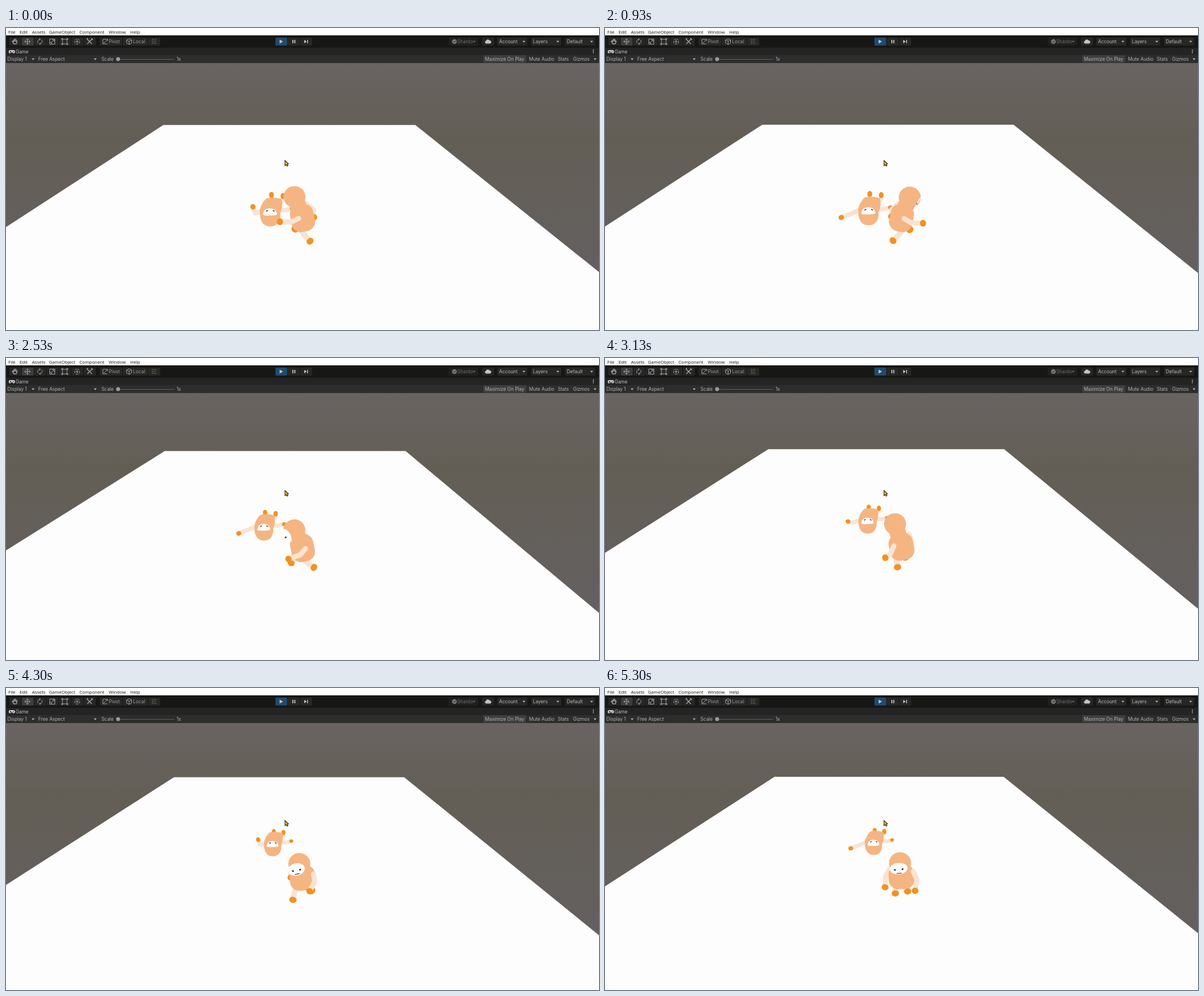
Recreate the animation shown at these times as an HTML page. Size 1050x534 px, loop 5.33 s.

```html
<!DOCTYPE html>
<html lang="en">
<head>
<meta charset="utf-8">
<title>Game view</title>
<style>
html, body { margin: 0; width: 100%; height: 100%; overflow: hidden; background: #191919; }
svg { display: block; width: 100vw; height: 100vh; }
text { font: 8.3px Inter, Roboto, sans-serif; fill: #bcbcbc; white-space: pre; }
.menu text { font: 8px "Open Sans", "Noto Sans", sans-serif; fill: #111; }
.icons { fill: none; stroke: #a2a2a2; stroke-width: 1; }
.solid { fill: #c4c4c4; stroke: none; }
</style>
</head>
<body>
<svg viewBox="0 0 1050 534" preserveAspectRatio="none">
  <defs>
    <linearGradient id="sky" gradientUnits="userSpaceOnUse" x1="0" y1="62" x2="0" y2="434">
      <stop offset="0" stop-color="#696462"/>
      <stop offset=".35" stop-color="#635e55"/>
      <stop offset="1" stop-color="#646060"/>
    </linearGradient>
  </defs>
  <rect y="62" width="1050" height="472" fill="url(#sky)"/>
  <g id="scene"></g>
  <rect width="1050" height="13" fill="#fff"/>
  <rect y="13" width="1050" height="22" fill="#171715"/>
  <rect y="35" width="1050" height="13" fill="#242424"/>
  <rect y="48" width="1050" height="14" fill="#2d2d2c"/>
  <g id="buttons"></g>
  <g id="menu" class="menu"></g>
  <g id="labels"></g>
  <g class="icons">
    <path d="M13 25v-4M15 24v-5M17 24v-5M19 25v-4M13 25l-2-2 3 5h4l2-4" stroke-width="1.5"/>
    <path d="M33 24h10M38 19v10M35 22l-2 2 2 2M41 22l2 2-2 2M36 21l2-2 2 2M36 27l2 2 2-2"/>
    <path d="M57 27a4.300 4.300 0 0 1 3-7h1M63 21a4.300 4.300 0 0 1-3 7h-1M59 18l2 2-2 2M61 26l-2 2 2 2"/>
    <path d="M77.500 19.500h9v9h-9zM77.500 25.500h3v3M81 25l4-4M82 21h3v3"/>
    <path d="M100 20h8v8h-8zM98.500 18.500h2v2h-2zM107.500 18.500h2v2h-2zM98.500 27.500h2v2h-2zM107.500 27.500h2v2h-2z"/>
    <circle cx="126" cy="24" r="4.600" stroke-dasharray="4 1.500"/>
    <path d="M123 24h6M126 21v6"/>
    <path d="M144 20l8 8M152 20l-8 8M143 20l2-2M151 18l3 3" stroke-width="1.500"/>
    <path d="M171.500 20v8h8M172 20h8v3M173 27l7-7"/>
    <path d="M218 19l4.500 2.300v5L218 29l-4.500-2.700v-5zM213.500 21.300l4.500 2.200 4.500-2.200M218 23.500V29"/>
    <path d="M258 21h10M258 24h6M258 27h10M260 19v10M264 19v10" stroke="#77604f" stroke-dasharray="2 1.500"/>
    <path class="solid" d="M484.500 20.500l6 3.500-6 3.500zM507 21h1.800v6H507zM510.500 21h1.800v6h-1.800zM528 21l4.500 3-4.500 3zM533.300 21h1.400v6h-1.400z"/>
    <circle cx="794" cy="24" r="4.300" fill="#777" stroke="none"/>
    <path d="M792 24l1.500 1.700 3-3.500" stroke="#222"/>
    <path class="solid" d="M850 27.500a2.600 2.600 0 0 1 0-5 3.300 3.300 0 0 1 6-.5 2.800 2.800 0 0 1 1 5.500z"/>
    <path class="solid" d="M7.500 39h5.500a2.800 2.800 0 0 1 0 5.800l-2-1.600H9.600l-2 1.600a2.800 2.800 0 0 1 0-5.800z"/>
    <path d="M7 42h2.400M8.200 40.800v2.400M12 42h1.500" stroke="#242424"/>
    <path class="solid" d="M1039.300 38h1.500v1.500h-1.500zM1039.300 40.500h1.500v1.500h-1.500zM1039.300 43h1.500v1.500h-1.500z"/>
    <path d="M198 55.500h100" stroke="#5f5f5f"/>
    <circle cx="198.500" cy="55" r="3.500" fill="#9b9b9b" stroke="none"/>
  </g>
  <g id="carets"></g>
  <path d="M494 234.300v9l2-1.600 1.700 2.600 1.600-.9-1.400-2.600 2.300-.5z" fill="#e6bc25" stroke="#2e260c" stroke-width="1.100"/>
</svg>
<script>
const $ = id => document.getElementById(id);
const BODY = '#f5b582', SKIN = '#f9e3d4', PAW = '#f4911f', WHITE = '#fdfdfd', INK = '#272320';
const LOOP = 5330;

function set(el, attrs) {
  for (const k in attrs) el.setAttribute(k, attrs[k]);
  return el;
}
function add(parent, tag, attrs = {}) {
  return parent.appendChild(set(document.createElementNS('http://www.w3.org/2000/svg', tag), attrs));
}

// ---- editor chrome ----
const label = (group, s, x, y, fill) => {
  add($(group), 'text', { x, y, ...(fill && { style: `fill:${fill}` }) }).textContent = s;
};
const button = (x, width, fill = '#272726') =>
  add($('buttons'), 'rect', { x, y: 17, width, height: 14, rx: 1.5, fill });
const caret = (x, y, fill = '#b8b8b8') =>
  add($('carets'), 'path', { d: `M${x - 2.6} ${y - 1.3}h5.200l-2.600 3z`, fill });

const menu = { File: 4, Edit: 24, Assets: 46, GameObject: 76, Component: 130, Window: 182, Help: 220 };
for (const s in menu) label('menu', s, menu[s], 9.7);

for (let i = 0; i < 7; i++) button(6 + i * 22, 21, i === 1 ? '#3d3d3d' : undefined);
button(166, 40);
button(207, 44);
button(252, 21);
for (let i = 0; i < 3; i++) button(477 + i * 22, 21, i ? undefined : '#204a6e');
button(784, 52, '#20201f');
button(843, 21);
['Account', 'Layers', 'Default'].forEach((s, i) => {
  button(870 + i * 60, 53);
  label('labels', s, 873 + i * 60, 27);
  caret(917 + i * 60, 24);
});
label('labels', 'Pivot', 182, 27, '#9c9c9c');
label('labels', 'Local', 225, 27, '#9c9c9c');
label('labels', 'Shardo', 799, 27, '#6d6d6d');
caret(829, 24, '#666');
label('labels', 'Game', 17, 44.6);

const bar = { 'Display 1': 2.5, 'Free Aspect': 57, Scale: 169, '1x': 302, 'Maximize On Play': 848,
  'Mute Audio': 926, Stats: 977, Gizmos: 1004 };
for (const s in bar) label('labels', s, bar[s], bar[s] > 160 && bar[s] < 400 ? 58.3 : 57.7, '#b2b2b2');
add($('buttons'), 'rect', { x: 845, y: 48, width: 76, height: 13.5, fill: '#3e3e3e' });
[48, 158, 1043].forEach(x => caret(x, 55));

// ---- motion: [time, value] ----
const topEdge = [[0, 171.5], [930, 171], [1770, 168], [2530, 164.5], [3730, 158], [5300, 157]];
const pan = [[0, -.146], [930, -.151], [1350, -.249], [1770, -.2], [2240, -.236], [2530, -.201],
  [3330, -.177], [3730, -.113], [4300, -.163], [5300, -.152]];
const heading = [[0, -109], [930, -257], [1770, -250], [2530, -75], [3730, -185], [4300, -22], [5300, -10]];
const strides = [[0, 0], [930, 1.5], [1770, 2.85], [2530, 4], [3730, 5.5], [4300, 6], [5300, 7.25]];
const reach = [[0, 0], [930, 1], [2530, 1], [3730, 0], [4300, 0], [5300, 1]];

const linear = u => u;
const ease = u => (1 - Math.cos(Math.PI * u)) / 2;
function at(keys, t, curve = linear) {
  let i = 0;
  while (i < keys.length - 2 && keys[i + 1][0] <= t) i++;
  const [[t0, a], [t1, b]] = keys.slice(i, i + 2);
  return a + (b - a) * curve((t - t0) / (t1 - t0));
}

// ---- parts ----
const scene = $('scene');
const floor = add(scene, 'path', { fill: WHITE });

function limb(parent) {
  const group = add(parent, 'g');
  const skin = add(group, 'path', { fill: 'none', stroke: SKIN, 'stroke-linecap': 'round', 'stroke-linejoin': 'round' });
  const paw = add(group, 'ellipse', { fill: PAW });
  const draw = (root, joint, tip, width, rx, ry) => {
    const turn = Math.atan2(tip[1] - joint[1], tip[0] - joint[0]) * 180 / Math.PI;
    set(skin, { d: 'M' + [root, joint, tip].map(p => p.slice(0, 2).join(' ')).join('L'), 'stroke-width': width });
    set(paw, { rx, ry, transform: `translate(${tip[0]} ${tip[1]}) rotate(${turn})` });
  };
  return { group, draw };
}

const lying = add(scene, 'g');
const lyingLegs = [limb(lying), limb(lying)], lyingArms = [limb(lying), limb(lying)];
add(lying, 'path', { fill: BODY, d: 'M-8-25Q5-28 19-24Q22-8 17 0Q18 25-2 25Q-20 24-20-2Q-18-16-8-25Z' });
add(lying, 'path', { fill: WHITE, d: 'M-14 3Q-13-7-2-7.500Q9-7 11 2Q11 5 7 5Q-2 6-11 5.500Q-14 5.500-14 3Z' });
add(lying, 'path', { stroke: INK, 'stroke-width': 1.5, d: 'M-8.500-2l3-1.800M3.500-3.800l3 1.800' });

const walker = add(scene, 'g');
const legs = [limb(walker), limb(walker)], arms = [limb(walker), limb(walker)];
const trunk = add(walker, 'g', { fill: BODY });
const torso = add(trunk, 'rect', { rx: 17 });
const neck = add(trunk, 'path', { stroke: BODY, 'stroke-width': 29, 'stroke-linecap': 'round' });
const head = add(trunk, 'ellipse', { rx: 19.5, ry: 19 });
const face = add(trunk, 'g');
const mask = add(face, 'ellipse', { fill: WHITE });
const eyes = [-1, 1].map(() => add(face, 'ellipse', { fill: INK, ry: 1.3 }));
const mouth = add(face, 'path', { stroke: INK, 'stroke-width': 1.1 });

// All floor points share one vanishing point
const VX = 525, VY = 11.8, HALF = 1.397;

function drawFloor(t) {
  const top = at(topEdge, t), p = at(pan, t, ease), k = top - VY;
  const side = w => VY + VX / w;
  set(floor, { d: `M0 ${side(HALF - p)}L${VX + k * (p - HALF)} ${top}H${VX + k * (p + HALF)}L1050 ${side(HALF + p)}V534H0Z` });

  const near = 1 / (1 / k - .00308);
  set(lying, { transform: `translate(${VX + near * (p - .032)} ${VY + near}) scale(${near / 316})` });
  lyingLegs.forEach(({ draw }, i) => {
    const x = 1 + i * 20.5, y = -31 + (top - 171) * -.3 + i * 2;
    draw([x + (i ? -3 : -4), -18], [x, y + 7], [x, y], 7, 5.5, 4.3);
  });
  const r = at(reach, t, ease);
  lyingArms[0].draw([-18, -2], [-28 - 6 * r, 1 + 4 * r], [-32 - 18 * r, -10 + 21 * r], 8.5, 5, 4.5);
  lyingArms[1].draw([17, -4], [26, -4], [38, -7], 8, 4.2, 3.5);
}

function drawWalker(t) {
  const yaw = at(heading, t, ease) * Math.PI / 180, sin = Math.sin(yaw), cos = Math.cos(yaw);
  const phase = 2 * Math.PI * at(strides, t), swing = -Math.cos(phase);
  const bob = -2 * Math.sin(phase) ** 2;
  // side, height, forward -> screen x, y, nearness
  const point = (s, h, f) => {
    const d = f * cos - s * sin;
    return [525 + s * cos + f * sin, 336 + bob + .65 * d - .76 * h, d];
  };

  const w = 40 + 6 * Math.abs(cos), h = 42 + 7 * Math.abs(sin);
  const [hx, hy] = point(0, 45, 15);
  set(torso, { x: -w / 2, y: -h / 2, width: w, height: h, transform: `translate(525 ${336 + bob}) rotate(${12 * sin})` });
  set(neck, { d: `M${hx} ${hy}L525 ${332 + bob}` });
  set(head, { cx: hx, cy: hy });

  const rx = 16 * (cos + .3) / 1.3, ry = 9.4 + 4 * Math.abs(sin), wide = rx > 9;
  set(face, { transform: `translate(${hx + 14 * sin} ${hy + 10}) rotate(${30 * sin})`, visibility: rx > .6 ? 'visible' : 'hidden' });
  set(mask, { rx: Math.max(0, rx), ry });
  eyes.forEach((eye, i) => {
    const side = i * 2 - 1;
    set(eye, {
      rx: Math.max(.7, Math.min(1.9, rx * .25)),
      transform: `translate(${side * rx * .43} 1.600) rotate(${wide ? side * -25 : 0})`,
      visibility: i && !wide ? 'hidden' : 'inherit'
    });
  });
  set(mouth, { d: wide ? `M${-rx * .28} 8.300H${rx * .28}` : '' });

  [-1, 1].forEach((side, i) => {
    const step = side * swing;
    const lift = 8 * Math.max(0, side * Math.sin(phase));
    legs[i].draw(point(side * 10, -18, 0), point(side * 11, -28 + lift, step * 9 + 2),
      point(side * 11, -40 + lift, step * 18), 10, 5.5, 6.5);

    const angle = (25 - 45 * step) * Math.PI / 180;
    const f = 35 * Math.sin(angle), drop = 35 * Math.cos(angle);
    const elbow = point(side * 28, 16 - drop / 2, f / 2 - 5);
    arms[i].draw(point(side * 21, 16, 0), elbow, point(side * 27, 16 - drop, f), 9, 5.5, 6);
    if (elbow[2] > 4) walker.append(arms[i].group);
    else walker.insertBefore(arms[i].group, trunk);
  });
}

// frames alternate 30, 40, 30 ms
function render(now) {
  const t = now % LOOP, rest = t % 100;
  const step = t - rest + (rest < 30 ? 0 : rest < 70 ? 30 : 70);
  drawFloor(step);
  drawWalker(step);
}

const start = performance.now();
(function tick() {
  render(performance.now() - start);
  requestAnimationFrame(tick);
})();
</script>
</body>
</html>
```
